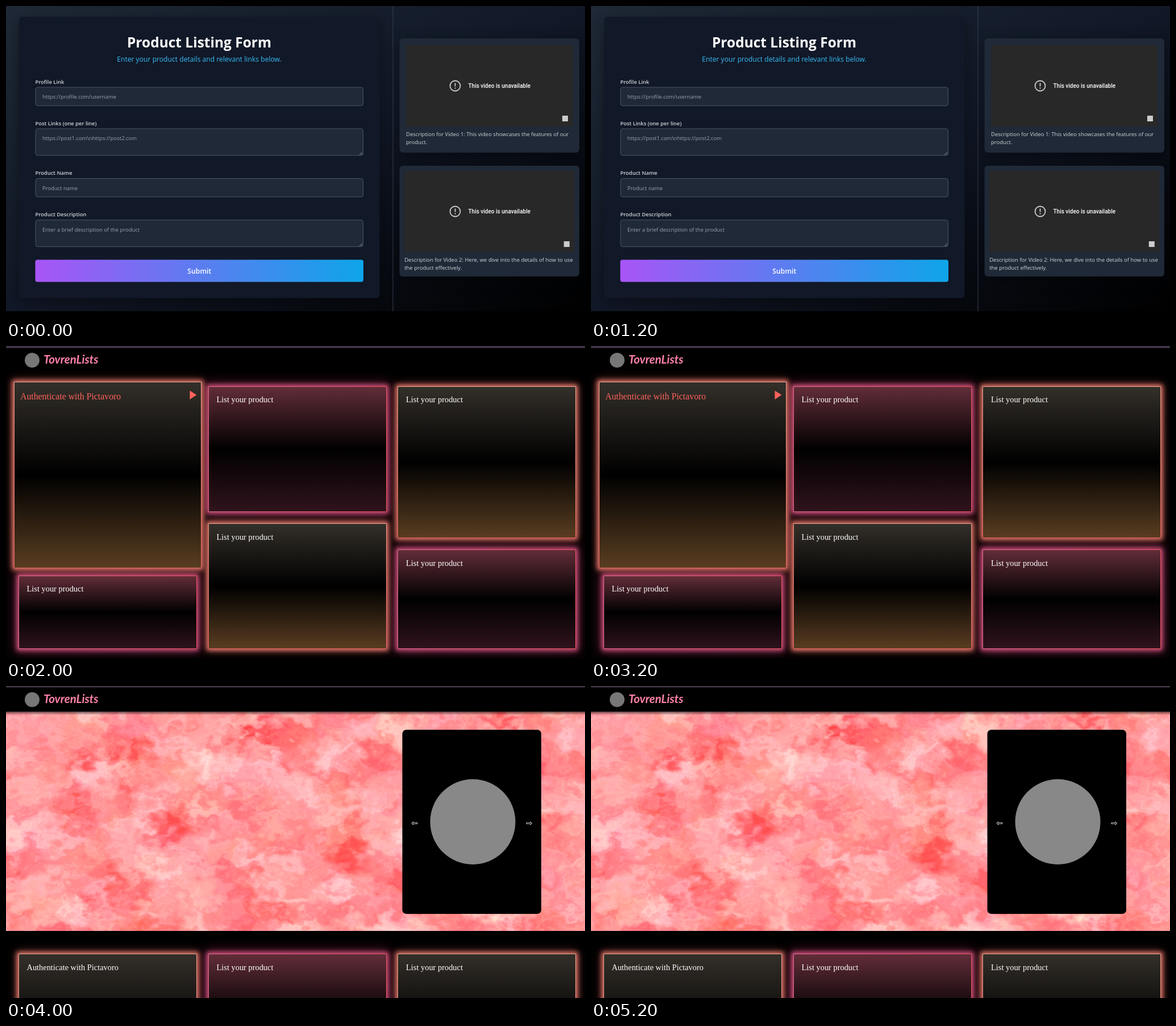
These frames come from a looping animation (1019x549 px, 6000 ms). An HTML page:

```html
<!DOCTYPE html>
<html lang="en">
<head>
<meta charset="utf-8">
<title>Product listing walkthrough</title>
<style>
  html, body { margin: 0; width: 100%; height: 100%; overflow: hidden; background: #000; }
  .scene { position: absolute; left: 0; top: 0; width: 1019px; height: 549px; overflow: hidden; background: #000; }
  .scene[hidden] { display: none; }
  .scene > svg { position: absolute; left: 0; top: 0; }

  .form text { font: 9.45px "Open Sans", "Noto Sans", sans-serif; fill: #9ca3af; }
  .form .title { font-size: 24.5px; font-weight: 700; fill: #fff; }
  .form .subtitle { font-size: 12.15px; fill: #38bdf8; }
  .form .label { font-size: 9.4px; font-weight: 600; fill: #d1d5db; }
  .form .submit { font-size: 12.2px; font-weight: 600; fill: #fff; }
  .form .caption { font-size: 9.5px; fill: #d1d5db; }
  .form .notice { font: 500 10px Roboto, sans-serif; fill: #fff; }
  .middle { text-anchor: middle; }
  .field { fill: #1f2937; stroke: #4b5563; }
  .shadow { filter: drop-shadow(0 6px 12px #0006); }

  .card {
    position: absolute; box-sizing: border-box; border: 1.5px solid transparent;
    color: #fff; font: 14.4px/17px "Liberation Serif", "Times New Roman", serif; white-space: nowrap;
  }
  .card span { position: absolute; left: 14px; top: 14.5px; }
  .amber {
    background: linear-gradient(#332f29, #000 50%, #593d21) padding-box,
                linear-gradient(#dda088, #e0605a) border-box;
    box-shadow: 0 0 8px 3px #e8786e, 0 0 16px 4px #e8665c55;
  }
  .rose {
    background: linear-gradient(#622d39, #000 50%, #30131c) padding-box,
                linear-gradient(90deg, #e06a90, #e0505a) border-box;
    box-shadow: 0 0 8px 3px #d2527e, 0 0 20px 6px #c23a7066;
  }
  .active { color: #ff625c; font-size: 15.8px; }
  .active span { left: 10.5px; top: 15.5px; }
  .brand { font: italic 700 20.5px Lato, sans-serif; fill: #ff82a8; }
  .arrow { font: 14px "DejaVu Sans", sans-serif; fill: #fff; text-anchor: middle; }
</style>
</head>
<body>

<div class="scene form">
  <svg width="1019" height="549">
    <defs>
      <linearGradient id="page" x2="1" y2="1">
        <stop stop-color="#1f2937"/><stop offset=".5" stop-color="#111827"/><stop offset="1"/>
      </linearGradient>
      <linearGradient id="button">
        <stop stop-color="#a855f7"/><stop offset="1" stop-color="#0ea5e9"/>
      </linearGradient>
    </defs>
    <rect width="1019" height="537" fill="url(#page)"/>
    <path d="M681 0V537" stroke="#374151"/>
    <rect class="shadow" x="23" y="19" width="634.5" height="495" rx="6" fill="#111827"/>
    <text class="title middle" x="340" y="73">Product Listing Form</text>
    <text class="subtitle middle" x="340" y="97.5">Enter your product details and relevant links below.</text>
    <g id="fields"></g>
    <rect x="51.5" y="446.5" width="577.5" height="39" rx="4" fill="url(#button)"/>
    <text class="submit middle" x="340.3" y="471">Submit</text>
    <g id="videos"></g>
  </svg>
</div>

<div class="scene" id="cards" hidden>
  <svg width="1019" height="549">
    <rect width="1019" height="3.5" fill="#43354a"/>
    <circle cx="46" cy="25" r="13" fill="#777"/>
    <text class="brand" x="66" y="31">TovrenLists</text>
  </svg>
</div>

<div class="scene" id="home" hidden>
  <svg width="1019" height="549">
    <defs>
      <radialGradient id="blot">
        <stop stop-color="#ff4650"/><stop offset="1" stop-color="#ff4650" stop-opacity="0"/>
      </radialGradient>
      <linearGradient id="fade" x2="0" y2="1">
        <stop stop-opacity=".6"/><stop offset="1" stop-opacity="0"/>
      </linearGradient>
      <!-- soft clouds and blots, then torn by finer noise -->
      <filter id="marble" filterUnits="userSpaceOnUse" x="-40" y="5" width="1099" height="466"
              color-interpolation-filters="sRGB">
        <feTurbulence type="fractalNoise" baseFrequency=".011 .017" numOctaves="6" seed="8"/>
        <feColorMatrix result="clouds" values="0 0 0 0 1
          .65 0 0 0 .29  .6 .15 0 0 .245  0 0 0 0 1"/>
        <feBlend in="SourceGraphic" in2="clouds" mode="multiply" result="stained"/>
        <feTurbulence type="fractalNoise" baseFrequency=".035 .045" numOctaves="5" seed="3" result="grain"/>
        <feDisplacementMap in="stained" in2="grain" scale="75" xChannelSelector="R" yChannelSelector="G"/>
      </filter>
    </defs>
    <svg y="45" width="1019" height="386" viewBox="0 45 1019 386">
      <g id="texture" filter="url(#marble)"></g>
    </svg>
    <rect y="45" width="1019" height="6" fill="url(#fade)"/>
    <rect width="1019" height="2.5" fill="#43354a"/>
    <circle cx="46" cy="24" r="13" fill="#777"/>
    <text class="brand" x="66" y="30">TovrenLists</text>
    <rect x="697.5" y="77" width="244.5" height="324" rx="7"/>
    <circle cx="821.5" cy="239" r="75" fill="#888"/>
    <text class="arrow" x="719" y="245.5">⇦</text>
    <text class="arrow" x="921" y="245.5">⇨</text>
  </svg>
</div>

<script>
const byId = id => document.getElementById(id);

const field = (label, placeholder, top, height, resizable) => `
  <text class="label" x="51.5" y="${top - 6.5}">${label}</text>
  <rect class="field" x="52" y="${top}" width="576.5" height="${height}" rx="4"/>
  <text x="64" y="${top + 20.3}">${placeholder}</text>
  ${resizable ? `<path d="M622 ${top + height - 1}l5-5m-2 5l2-2" stroke="#aaa" stroke-width=".8"/>` : ''}`;

byId('fields').innerHTML =
  field('Profile Link', 'https://profile.com/username', 143, 32.5) +
  field('Post Links (one per line)', 'https://post1.com\\nhttps://post2.com', 216, 47, true) +
  field('Product Name', 'Product name', 303.5, 32.5) +
  field('Product Description', 'Enter a brief description of the product', 376.5, 47, true);

// inset: gap between the card edge and its player
const video = (top, height, inset, playerTop, lines) => {
  const x = 692.5 + inset, right = 1009 - inset, middle = playerTop + 71.5;
  return `
    <rect class="shadow" x="692.5" y="${top}" width="316.5" height="${height}" rx="6" fill="#1f2937"/>
    <rect x="${x}" y="${playerTop}" width="${right - x}" height="143" fill="#282828"/>
    <g fill="none" stroke="#ccc" stroke-width="1.8">
      <circle cx="790.5" cy="${middle}" r="9"/>
      <path d="M790.5 ${middle - 5}v6m0 2v2"/>
    </g>
    <text class="notice" x="813.5" y="${middle + 3.5}">This video is unavailable</text>
    <rect x="${right - 18.5}" y="${playerTop + 124}" width="10" height="10" fill="#ccc"/>
    ${lines.map((line, i) => `<text class="caption" x="${x}" y="${playerTop + 160 + i * 14.3}">${line}</text>`).join('')}`;
};

byId('videos').innerHTML =
  video(57, 201, 11.5, 69, ['Description for Video 1: This video showcases the features of our', 'product.']) +
  video(281, 195, 8.7, 290, ['Description for Video 2: Here, we dive into the details of how to use', 'the product effectively.']);

const LIST = 'List your product', LOGIN = 'Authenticate with Pictavoro';
const card = (style, x, y, w, h, label = LIST) =>
  `<div class="card ${style}" style="left:${x}px;top:${y}px;width:${w}px;height:${h}px"><span>${label}</span></div>`;

byId('cards').insertAdjacentHTML('beforeend',
  card('rose', 21.5, 403.5, 314, 129) +
  card('rose', 355.5, 70.5, 314, 221) +
  card('amber', 355.5, 312, 314, 221) +
  card('amber', 689, 70.5, 314, 267) +
  card('rose', 689, 358, 314, 174.5) +
  card('amber active', 13.5, 63, 330, 327.5, LOGIN) +
  '<svg width="1019" height="549"><path d="M323.5 78.5L335.5 86L323.5 94Z" fill="#ff625c"/></svg>');

byId('home').insertAdjacentHTML('beforeend',
  card('amber', 21.5, 471, 314, 311, LOGIN) +
  card('rose', 355.5, 471, 314, 221) +
  card('amber', 689, 471, 314, 267));

byId('texture').innerHTML = [
  [132, 125, 45, 30], [225, 118, 50, 20], [290, 235, 50, 35], [435, 85, 50, 20], [605, 300, 60, 35],
  [190, 335, 50, 35], [145, 380, 35, 25], [870, 60, 60, 20], [640, 130, 70, 25], [480, 400, 70, 25]
].map(([x, y, rx, ry]) =>
  `<ellipse cx="${x}" cy="${y}" rx="${rx}" ry="${ry}" fill="url(#blot)" opacity=".6"/>`).join('');

const scenes = [...document.querySelectorAll('.scene')];
function draw() {
  const current = Math.floor(performance.now() % 6000 / 2000);
  scenes.forEach((scene, i) => { scene.hidden = i !== current; });
  requestAnimationFrame(draw);
}
draw();
</script>
</body>
</html>
```
